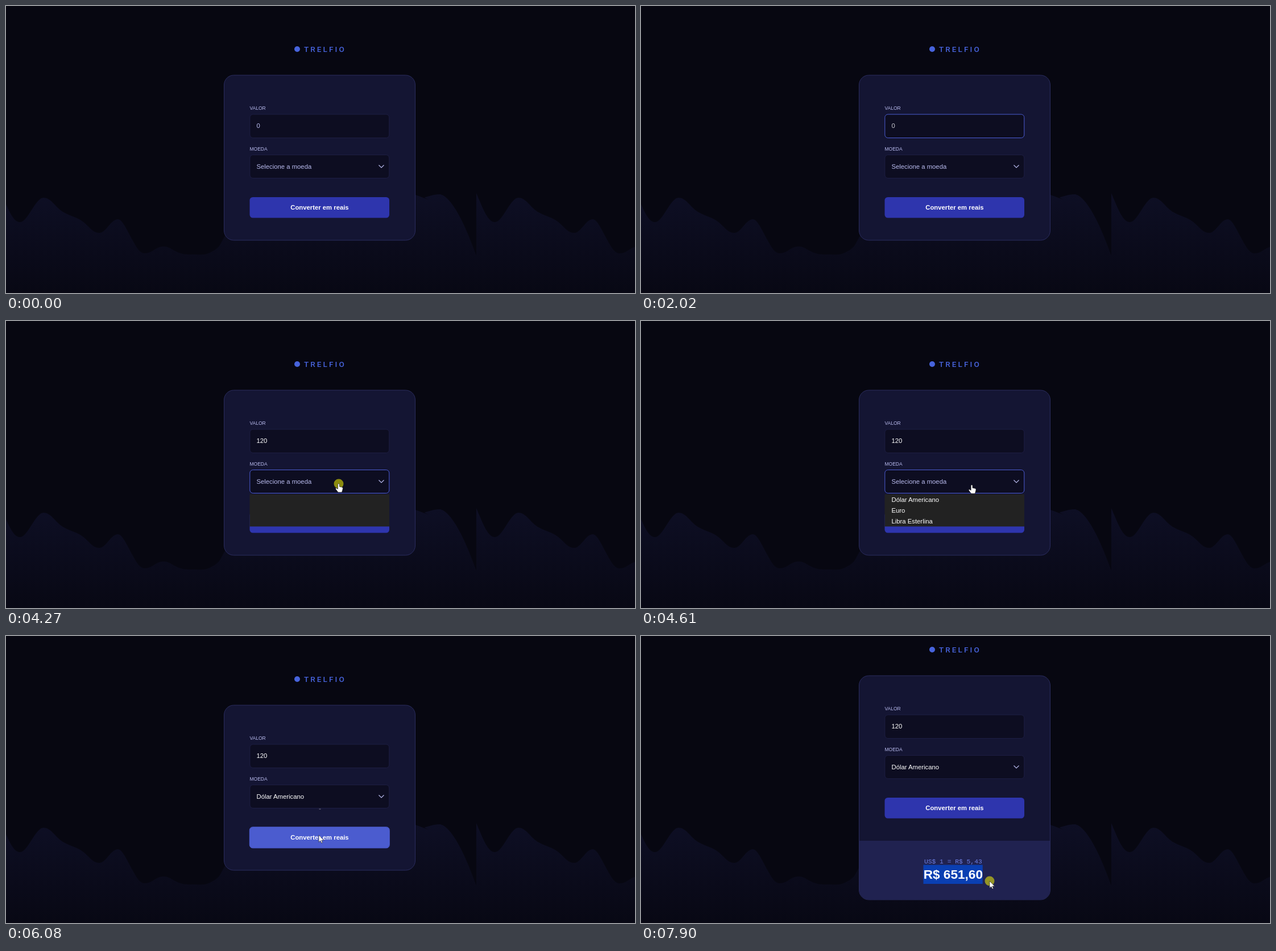
Animation, 1106 px wide and 506 px high, one loop 8 s. Source, as an HTML page:

```html
<!DOCTYPE html>
<html lang="pt-BR">
<head>
<meta charset="utf-8">
<title>Conversor de moedas</title>
<style>
  html, body { margin: 0; width: 100%; height: 100%; overflow: hidden; background: #070711; }
  svg { display: block; width: 1106px; height: 506px; }
  text { font: 11.3px Arial, "Liberation Sans", sans-serif; fill: #b9bbee; white-space: pre; }
  .label { font-size: 8.47px; }
  .brand { font: 500 13.5px Roboto, sans-serif; letter-spacing: 3.1px; fill: #4763dc; }
  .bold { font-weight: bold; fill: #fff; }
  .total { font-size: 22.6px; }
  .rate { font: 11.3px "Liberation Mono", monospace; fill: #6d80e6; }
  .option { fill: #fff; }
  .field { fill: #0d0d21; stroke: #1d1e43; }
  .field.focus { stroke: #4b5cd2; }
</style>
</head>
<body>
<svg viewBox="0 0 1106 506">
  <defs>
    <linearGradient id="fade" x1="0" y1="0" x2="0" y2="1">
      <stop offset="0" stop-color="#0e0f25"/>
      <stop offset="1" stop-color="#080814"/>
    </linearGradient>
    <path id="wave" fill="url(#fade)" d="M0 330C12 358 20 381 33 381S60 338 74 338S95 356 110 364S132 372 143 380
      S160 400 172 400S192 376 205 376S235 436 251 436S270 424 285 424S305 438 330 438S358 440 372 432S385 418 395 402
      S640 300 715 328S738 338 745 337S758 332 770 332S805 355 835 440V506H0Z"/>
  </defs>
  <use href="#wave" x="-8"/>
  <use href="#wave" x="827"/>

  <g id="page">
    <circle cx="512" cy="76" r="5" fill="#4763dc"/>
    <text class="brand" x="524" y="81">TRELFIO</text>
    <rect id="card" x="383.5" y="122" width="336" height="291" rx="17" fill="#141533" stroke="#2a2c5e"/>

    <text class="label" x="428.5" y="183">VALOR</text>
    <rect id="valueBox" class="field" x="428.8" y="191" width="245" height="41.5" rx="5.5"/>
    <text id="value" x="440.5" y="215"></text>
    <rect id="caret" y="205" width="1" height="13" fill="#e4e4ee"/>

    <text class="label" x="428.5" y="254.5">MOEDA</text>
    <rect id="selectBox" class="field" x="428.8" y="262.5" width="245" height="41" rx="5.5"/>
    <text id="currency" x="440.5" y="286.7"></text>
    <path d="M655.5 280.5l4.5 4.5 4.5-4.5" fill="none" stroke="#b9bbee" stroke-width="1.2"/>
    <rect id="speck" x="550.5" y="304.5" width="3" height="1.5" fill="#5a5a70"/>

    <rect x="428.5" y="337" width="245.5" height="36.5" rx="5.5" fill="#2e35ad"/>
    <rect id="hover" x="428.5" y="337" width="245.5" height="36.5" rx="5.5" fill="#4b5ccf"/>
    <rect id="ring" x="428.3" y="336.8" width="246" height="37" rx="5.5" fill="none" stroke="#4f60d4"/>
    <text class="bold" x="500.3" y="359">Converter em reais</text>

    <g id="result">
      <path d="M384 413H719V500a17 17 0 0 1-17 17H401a17 17 0 0 1-17-17Z" fill="#202250"/>
      <text class="rate" x="498" y="452.5">US$ 1 = R$ 5,43</text>
      <rect id="selection" x="496.5" y="455.5" height="33.5" fill="#0a3fb2"/>
      <text id="total" class="bold total" x="496.7" y="480">R$ 651,60</text>
    </g>
  </g>

  <g id="popup">
    <rect x="428.5" y="305.5" width="245.5" height="56.8" fill="#222"/>
    <g id="options">
      <rect id="row" x="428.5" y="305.5" width="245.5" height="19" fill="#404040"/>
      <text class="option" x="440.5" y="319">Dólar Americano</text>
      <text class="option" x="440.5" y="338">Euro</text>
      <text class="option" x="440.5" y="357">Libra Esterlina</text>
    </g>
  </g>

  <g id="pointer">
    <circle id="press" r="8.5" fill="#ff0" opacity=".52"/>
    <path id="arrow" fill="#fff" stroke="#111" stroke-width=".6" d="M0 0V12.4L2.8 9.8 4.7 14 6.6 13.2 4.8 9.2H8.8Z"/>
    <path id="hand" fill="#fff" stroke="#111" stroke-width=".6" d="M-1.5 1.2a1.4 1.4 0 0 1 2.8 0V5
      l4.6 1q1.5.5 1.5 2.2L6.5 12 5.5 15H-1L-5.2 9.4q-.6-1.7.8-1.9l2.9 1.7Z"/>
    <path id="beam" fill="none" stroke="#d8d8e2" d="M-2.5-5H2.5M0-5V5M-2.5 5H2.5"/>
  </g>
</svg>

<script>
const el = {};
document.querySelectorAll('svg [id]').forEach(node => el[node.id] = node);

const LOOP = 8000, FRESH = 6150, LIFT = 52;

// Pointer strokes: start, end, number of steps, from, bend, to
const strokes = [
  [330, 1070, 12, [1075, 490], [720, 300], [502, 215]],
  [1200, 1200, 1, [502, 215], [500, 214], [500, 214]],
  [1400, 1610, 4, [500, 214], [430, 214], [357, 202]],
  [1750, 1950, 4, [348, 180], [322, 250], [314, 360]],
  [3360, 4140, 12, [912, 56], [640, 350], [585, 287]],
  [4480, 4950, 8, [585, 287], [555, 308], [522, 317]],
  [5300, 5750, 7, [522, 317], [530, 338], [550, 351]],
  [6830, 7300, 8, [548, 355], [515, 390], [499, 420]],
  [7500, 7900, 7, [499, 420], [550, 418], [613, 432]]
];

const clamp = v => Math.min(1, Math.max(0, v));
const during = (t, from, to) => t >= from && t < to;
const show = (node, on) => node.style.display = on ? '' : 'none';
const inside = (p, x, y, w, h) => p[0] >= x && p[0] <= x + w && p[1] >= y && p[1] <= y + h;

function pointerAt(t) {
  const [start, end, steps, a, b, c] = strokes.findLast(s => t >= s[0]) || strokes[0];
  const raw = end > start ? clamp((t - start) / (end - start)) : 1;
  const k = steps > 1 ? Math.floor(raw * (steps - 1) + 1e-6) / (steps - 1) : 1;
  const u = k * k * (3 - 2 * k), v = 1 - u;
  return a.map((_, i) => v * v * a[i] + 2 * u * v * b[i] + u * u * c[i]);
}

function pointerKind(p, fresh) {
  if (fresh) return inside(p, 496, 388, 107, 50) ? 'beam' : 'arrow';
  if (inside(p, 428, 191, 246, 42)) return 'beam';
  return inside(p, 428, 262, 246, 42) ? 'hand' : 'arrow';
}

function drawForm(t, fresh) {
  const typed = '120'.slice(0, [2570, 2830, 3030].filter(s => t >= s).length);
  const chosen = t >= 5200, focused = during(t, 1400, 4190);
  el.value.textContent = typed || '0';
  el.value.style.fill = typed ? '#fff' : focused ? '#c6c6ce' : '';
  el.caret.setAttribute('x', 440 + typed.length * 6.28);
  show(el.caret, during(t, 1400, 1950) || during(t, 2520, 3560) || during(t, 4090, 4190));
  el.valueBox.classList.toggle('focus', focused);

  el.currency.textContent = chosen ? 'Dólar Americano' : 'Selecione a moeda';
  el.currency.style.fill = chosen ? '#fff' : '';
  el.selectBox.classList.toggle('focus', during(t, 4190, 6020));
  show(el.popup, during(t, 4270, 5200));
  show(el.options, t >= 4320);
  show(el.speck, chosen && !fresh);

  el.hover.style.opacity = fresh ? 1 - clamp((t - FRESH) / 140) : clamp((t - 5550) / 150);
  show(el.ring, during(t, 6020, 7500));
}

function drawResult(t, fresh, x) {
  el.page.setAttribute('transform', `translate(0 ${fresh ? -LIFT : 0})`);
  el.card.setAttribute('height', fresh ? 395 : 291);
  show(el.result, fresh);
  let width = 0;
  if (t >= 7500) {
    for (let n = 1; n <= 9; n++) {
      const edge = el.total.getSubStringLength(0, n);
      if (496.7 + edge <= x + 3) width = edge;
    }
  }
  el.selection.setAttribute('width', width);
}

function draw(t) {
  const fresh = t >= FRESH, p = pointerAt(t), kind = pointerKind(p, fresh);
  drawForm(t, fresh);
  drawResult(t, fresh, p[0]);
  show(el.row, inside(p, 428, 305, 246, 19));
  show(el.pointer, during(t, 330, 2020) || t >= 3360);
  el.pointer.setAttribute('transform', `translate(${p})`);
  ['arrow', 'hand', 'beam'].forEach(name => show(el[name], name === kind));
  show(el.press, during(t, 1400, 1470) || during(t, 4190, 4320) || during(t, 5130, 5200)
    || during(t, 6020, 6080) || t >= 7500);
}

function tick() {
  draw(performance.now() % LOOP);
  requestAnimationFrame(tick);
}
tick();
</script>
</body>
</html>
```
